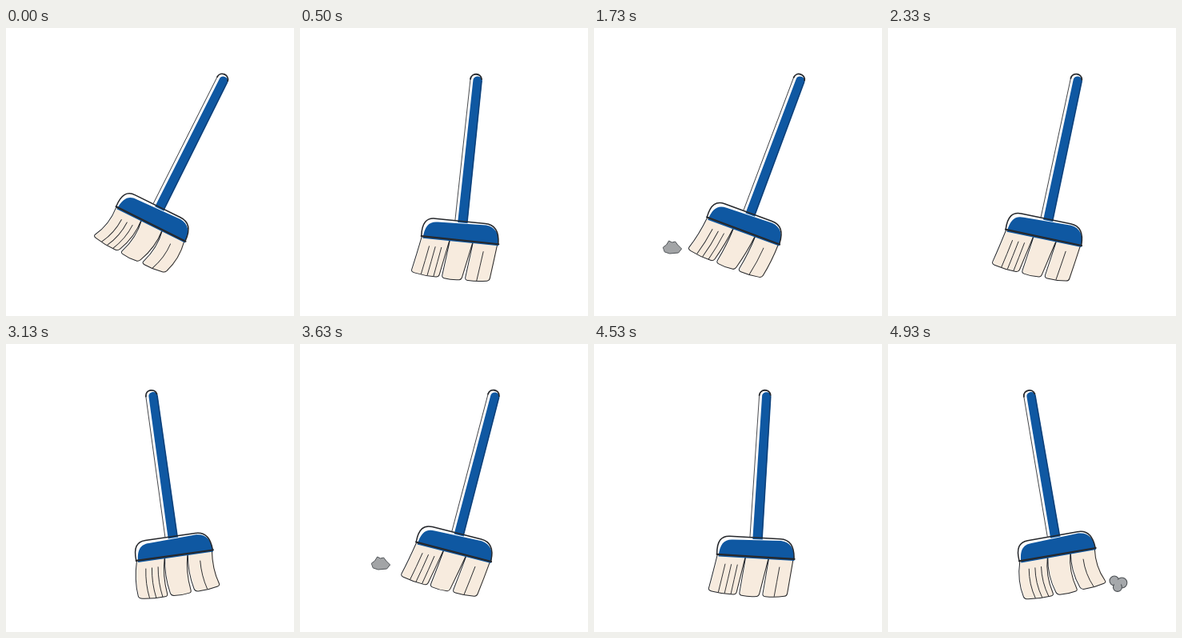
Animation, 360 px wide and 360 px high, one loop 5000 ms. Source, as an HTML page:

```html
<!DOCTYPE html>
<html lang="en">
<head>
<meta charset="utf-8">
<title>Sweeping broom</title>
<style>
html, body { margin: 0; width: 100%; height: 100%; overflow: hidden; background: #fff; }
svg { display: block; width: 100vw; height: 100vh; }
path { stroke-linecap: round; stroke-linejoin: round; }
.ink { fill: none; stroke: #26282c; }
.blue { fill: #0f58a2; }
</style>
</head>
<body>
<svg viewBox="0 0 360 360">
  <g id="broom">
    <path id="fill" fill="#f7ebde" transform="translate(1 0)"/>
    <path id="edges" class="ink" stroke-width="1"/>
    <path id="strands" class="ink" stroke-width=".9"/>
    <path class="blue" d="M-5.5 182 L-4 3 C-4 -4 7 -4 7.5 3 L7 182 Z"/>
    <path class="ink" stroke-width=".8" d="M-9 179 L-7.5 1"/>
    <path fill="none" stroke="#153a69" stroke-width="1" d="M6.5 3 L6 180"/>
    <path class="ink" stroke-width="1.8" d="M-7.5 2 C-7 -6.5 5 -7 6.5 1"/>
    <path class="blue" d="M-47 206 C-46 190 -41 184 -30 184 L30 182 C42 183 48 191 48 206 Z"/>
    <path class="ink" stroke-width="1.5" d="M-49 203 C-50 187 -45 180 -34 180 L29 180 C41 180 47 188 47.5 203"/>
    <path class="ink" stroke-width="2.2" d="M-49 203.5 L48 204"/>
  </g>
  <g id="puff" fill="#a5a8ab" stroke="#4c5054" stroke-width="1.1">
    <circle cx="7" cy="-3" r="6"/>
    <circle cx="16.5" cy="-.5" r="6.5"/>
    <circle cx="11" cy="5" r="5.5"/>
    <circle cx="11" cy="0" r="4.5" stroke="none"/>
  </g>
  <path id="pebble" fill="#a2a4a6" stroke="#505458" stroke-width="1"
    d="M-11 0 L-7 -3 L-4 -8 L0 -6 L4 -7 L7 -3 L12 2 L8 7 L-3 8 L-9 6 Z"/>
</svg>
<script>
const LOOP = 5000;
const RIGHT = 26.3, LEFT = -10.2;            // end tilts in degrees
const TURNS = [0, 1030, 1960, 2940, 4020, 4980]; // moments of turning, right first
const LOWS = TURNS.filter((_, i) => i % 2);

const el = id => document.getElementById(id);
const mix = (a, b, k) => a + (b - a) * k;
const mixPt = (p, q, k) => [mix(p[0], q[0], k), mix(p[1], q[1], k)];
const pt = p => p.map(n => n.toFixed(2)).join(" ");

// Cosine swing; strokes to the left start a little faster
function tiltAt(t) {
  const end = Math.max(1, TURNS.findIndex(s => s > t));
  const i = t >= TURNS[5] ? 4 : end - 1;
  const u = Math.min(1, (t - TURNS[i]) / (TURNS[i + 1] - TURNS[i]));
  const toLeft = i % 2 === 0;
  const k = (1 - Math.cos(Math.PI * u ** (toLeft ? 0.85 : 1.1))) / 2;
  return toLeft ? mix(RIGHT, LEFT, k) : mix(LEFT, RIGHT, k);
}

const tipX = tilt => 205.3 + 2.75 * tilt - 0.0085 * tilt * tilt;
const bendOf = tilt => ((tilt - 8) / 18.2) ** 3;

// One bristle curve: u across the top, v across the bottom
function bristle(u, v, bend) {
  const right = Math.max(0, -bend), left = Math.max(0, bend);
  const top = [mix(-48.5, 46.5, u), 204.5];
  const end = [mix(-57.5 + 7 * right - left, 41 + 13 * right + left, v),
    mix(249 + 2.5 * right, 250.5 - 2 * right, v) + 12 * v * (1 - v)];
  const mid = [(top[0] + end[0]) / 2 + 7 * bend, 229];
  return [top, mid, end];
}

function along([a, b, c], k) {
  return mixPt(mixPt(a, b, k), mixPt(b, c, k), k);
}

// A bundle of bristles with rounded lower corners
function tuft(u0, u1, v0, v1, bend) {
  const l = bristle(u0, v0, bend), r = bristle(u1, v1, bend), cut = 0.93;
  const low = mixPt(l[2], r[2], 0.5);
  low[1] += 2;
  return `M${pt(l[0])} Q${pt(mixPt(l[0], l[1], cut))} ${pt(along(l, cut))}`
    + ` Q${pt(l[2])} ${pt(mixPt(l[2], low, 0.25))} Q${pt(low)} ${pt(mixPt(r[2], low, 0.2))}`
    + ` Q${pt(r[2])} ${pt(along(r, cut))} Q${pt(mixPt(r[0], r[1], cut))} ${pt(r[0])}`;
}

function strand(u, bend) {
  const [a, b, c] = bristle(u, u, bend), from = 0.22;
  return `M${pt(along([a, b, c], from))} Q${pt(mixPt(b, c, from))} ${pt(c)}`;
}

function show(id, on, x, y, size) {
  el(id).setAttribute("visibility", on ? "visible" : "hidden");
  if (on) el(id).setAttribute("transform", `translate(${x} ${y}) scale(${size})`);
}

// Time since the latest low turn plus delay, if still within life
function age(t, delay, life) {
  const low = LOWS.find(s => t >= s + delay && t < s + delay + life);
  return low === undefined ? -1 : t - low - delay;
}

function draw(t) {
  const tilt = tiltAt(t), bend = bendOf(tilt);
  el("broom").setAttribute("transform", `translate(${tipX(tilt)} 62.5) rotate(${tilt})`);
  const shape = tuft(0, 0.37, 0, 0.355, bend)
    + tuft(0.375, 0.675, 0.395, 0.645, bend) + tuft(0.68, 1, 0.69, 1, bend);
  el("fill").setAttribute("d", shape);
  el("edges").setAttribute("d", shape);
  el("strands").setAttribute("d", [0.13, 0.21, 0.29, 0.84].map(u => strand(u, bend)).join(""));

  const p = age(t, -220, 400);
  show("puff", p >= 0, 276, 299, 0.7 + 0.3 * Math.sin(Math.PI * p / 400));
  const r = age(t, 580, 380);
  show("pebble", r >= 0, 94.5 + 25.5 * Math.cos(Math.PI * r / 260), 274, Math.min(1, (400 - r) / 150));
}

// Pictures hold for 30 ms and 70 ms in turn
function hold(t) {
  const base = Math.floor(t / 100) * 100;
  return t - base < 30 ? base : base + 30;
}

const start = performance.now();
function tick() {
  draw(hold((performance.now() - start) % LOOP));
  requestAnimationFrame(tick);
}
tick();
</script>
</body>
</html>
```
